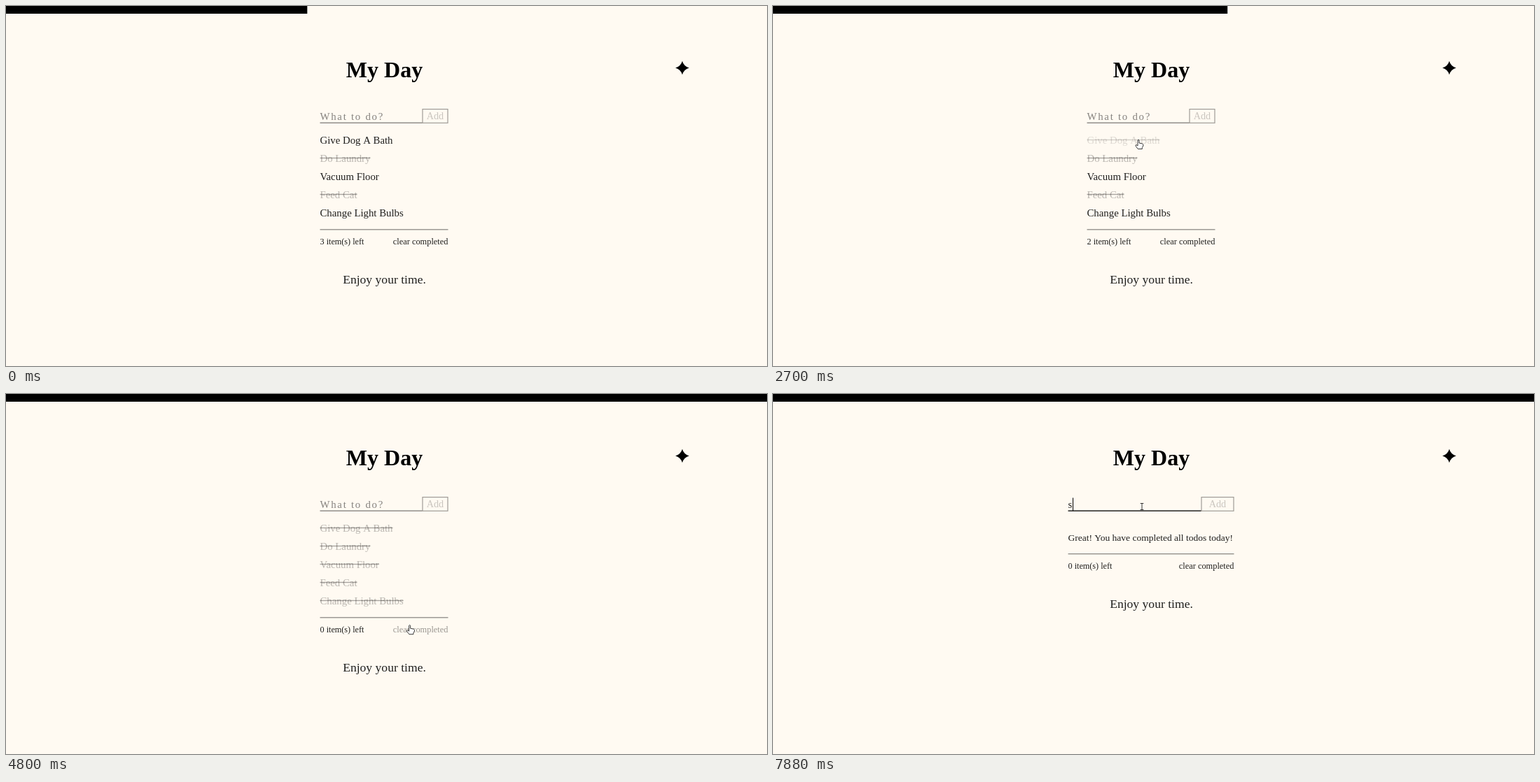
These frames come from a looping animation (1087 by 515 pixels, 8000 ms). An HTML page with a canvas:

```html
<!DOCTYPE html>
<html lang="en">
<head>
<meta charset="utf-8">
<title>My Day</title>
<style>
html, body { margin: 0; width: 100%; height: 100%; overflow: hidden; background: #fffaf2; }
canvas { display: block; }
</style>
</head>
<body>
<canvas id="stage" width="1087" height="515"></canvas>
<script>
const ctx = document.getElementById('stage').getContext('2d');
const LOOP = 8000, PAPER = '#fffaf2', INK = '#000';
const CLEARED = 5140, FOCUSED = 6090, TYPED = 7880, BLINK = 530;

// Todos with the time each one is ticked off
const todos = [
  { label: 'Give Dog A Bath', doneAt: 2700 },
  { label: 'Do Laundry', doneAt: -1 },
  { label: 'Vacuum Floor', doneAt: 3510 },
  { label: 'Feed Cat', doneAt: -1 },
  { label: 'Change Light Bulbs', doneAt: 4340 }
].map((todo, i) => ({ ...todo, y: 192 + 26 * i }));

// Pointer travel: first step, last step, number of steps, destination
const ENTRY = { x: 1027, y: 502 };
const moves = [
  [520, 1200, 11, 525, 192],
  [1270, 1340, 2, 525, 176],
  [1540, 1680, 3, 570, 158],
  [1810, 2020, 4, 521.5, 168],
  [2230, 2370, 3, 522, 191],
  [2840, 3120, 5, 521, 238],
  [3580, 4130, 9, 518.5, 299.5],
  [4410, 5000, 9, 597, 341],
  [5280, 5280, 1, 596, 339],
  [5410, 5840, 7, 530, 175],
  [5900, 5990, 2, 527, 161]
];
const clicks = [[2560, 2700], [3370, 3510], [4200, 4340], [5070, 5140], [6090, 6160]];

const ease = p => p * p * (3 - 2 * p);
const within = (p, x0, y0, x1, y1) => p.x >= x0 && p.x <= x1 && p.y >= y0 && p.y <= y1;

function pointerAt(t) {
  let { x, y } = ENTRY;
  for (const [start, end, steps, tx, ty] of moves) {
    if (t < start) break;
    const gap = (end - start) / Math.max(1, steps - 1) || 1;
    const step = Math.min(steps, Math.floor((t - start) / gap + 1e-6) + 1);
    const p = ease(step / steps);
    x += (tx - x) * p;
    y += (ty - y) * p;
    if (step < steps) break;
  }
  return { x, y };
}

function text(str, x, y, size, { alpha = 0.88, align = 'left', weight = 400, spacing = 0 } = {}) {
  ctx.font = `${weight} ${size}px "Liberation Serif", serif`;
  ctx.letterSpacing = spacing + 'px';
  ctx.textAlign = align;
  ctx.globalAlpha = alpha;
  ctx.fillStyle = INK;
  ctx.fillText(str, x, y);
  const width = ctx.measureText(str).width;
  ctx.globalAlpha = 1;
  return width;
}

function rect(x, y, w, h, alpha = 1) {
  ctx.fillStyle = `rgba(0,0,0,${alpha})`;
  ctx.fillRect(x, y, w, h);
}

function drawStar(cx, cy, r) {
  ctx.save();
  ctx.translate(cx, cy);
  ctx.fillStyle = '#000';
  ctx.beginPath();
  ctx.moveTo(0, -r);
  for (const [sx, sy, x, y] of [[1, -1, r, 0], [1, 1, 0, r], [-1, 1, -r, 0], [-1, -1, 0, -r]]) {
    ctx.quadraticCurveTo(sx * 2.2, sy * 2.2, x, y);
  }
  ctx.fill();
  ctx.restore();
}

const shapes = {
  arrow: new Path2D('M0 0V10.5L2.4 8.3L4 12L5.6 11.3L4 7.8L7 7.6Z'),
  hand: new Path2D('M-1 1Q0-.6 1 1V5L5.6 6Q7.3 6.6 6.8 9L5.3 11.5V13.5H-.8L-3.8 9.5Q-4.6 7.6-3 7.5L-1 9Z'),
  beam: new Path2D('M-2.3-4.5H2.3M-2.3 4.5H2.3M0-4.5V4.5')
};

function drawPointer(kind, { x, y }) {
  ctx.save();
  ctx.translate(x, y);
  ctx.lineWidth = 0.9;
  ctx.lineJoin = 'round';
  ctx.strokeStyle = '#222';
  ctx.fillStyle = '#fff';
  if (kind !== 'beam') ctx.fill(shapes[kind]);
  ctx.stroke(shapes[kind]);
  ctx.restore();
}

function drawTodo({ label, doneAt, y }, t, hovered) {
  const done = t >= doneAt;
  const fade = hovered ? 0.5 : 1;
  const width = text(label, 448.5, y + 5, 14.8, { alpha: fade * (done ? 0.27 : 0.88) });
  if (done) rect(448.5, y - 1.2, width, 1.4, fade * 0.34);
}

function drawForm(t, left, right, addLeft) {
  const focused = t >= FOCUSED;
  if (t >= TYPED) text('s', left, 163, 14.8);
  else text('What to do?', left, 163, 14.8, { alpha: 0.48, spacing: 1.75 });
  rect(left, 166.5, addLeft - left, 1.3, focused ? 1 : 0.5);

  ctx.strokeStyle = 'rgba(0,0,0,.38)';
  ctx.lineWidth = 1.2;
  ctx.strokeRect(addLeft + 0.5, 147.6, right - addLeft - 1, 19.7);
  text('Add', (addLeft + right) / 2, 162, 14.2, { alpha: 0.21, align: 'center' });

  const sinceKey = t - (t >= TYPED ? TYPED : FOCUSED);
  if (focused && Math.floor(sinceKey / BLINK) % 2 === 0) {
    rect(t >= TYPED ? 428 : 421, 148.5, 1, 18.5);
  }
}

function drawFooter(left, right, lineY, remaining, clearHovered) {
  const baseline = Math.round(lineY + 21.3);
  rect(left, lineY - 0.7, right - left, 1.4, 0.42);
  text(remaining + ' item(s) left', left, baseline, 12.2);
  text('clear completed', right, baseline, 12.4, { align: 'right', alpha: clearHovered ? 0.4 : 0.88 });
  text('Enjoy your time.', 540.5, baseline + 56, 17.6, { align: 'center' });
}

function draw(t) {
  ctx.fillStyle = PAPER;
  ctx.fillRect(0, 0, 1087, 515);

  const cleared = t >= CLEARED;
  const left = cleared ? 421.5 : 448.5;
  const right = cleared ? 658.5 : 631.5;
  const addLeft = cleared ? 611.5 : 594.5;
  const visible = t >= 450;
  const pointer = pointerAt(t);
  const remaining = todos.filter(todo => t < todo.doneAt).length;

  const hoveredTodo = visible && !cleared &&
    todos.find(({ y }) => within(pointer, left, y - 9, right, y + 9));
  const overClear = visible && !cleared && within(pointer, 552, 328, right, 346);
  const overInput = within(pointer, left, 147, addLeft, 169);

  rect(0, 0, 1087 - remaining * 218.9, 11);
  text('My Day', 540.5, 102, 32, { weight: 700, align: 'center', alpha: 1 });
  drawStar(966, 88.5, 9.8);
  drawForm(t, left, right, addLeft);

  if (cleared) text('Great! You have completed all todos today!', left, 210, 13.5);
  else todos.forEach(todo => drawTodo(todo, t, todo === hoveredTodo));
  drawFooter(left, right, cleared ? 228.7 : 319.8, remaining, overClear || (cleared && t < 5410));

  if (!visible) return;
  if (clicks.some(([from, to]) => t >= from && t < to)) {
    ctx.fillStyle = 'rgba(245,240,0,.62)';
    ctx.beginPath();
    ctx.arc(pointer.x + 0.4, pointer.y + 1.5, 8.7, 0, Math.PI * 2);
    ctx.fill();
  }
  const onLink = hoveredTodo || overClear || (cleared && t < 5280);
  drawPointer(overInput ? 'beam' : onLink ? 'hand' : 'arrow', pointer);
}

function tick() {
  draw(performance.now() % LOOP);
  requestAnimationFrame(tick);
}
tick();
</script>
</body>
</html>
```
